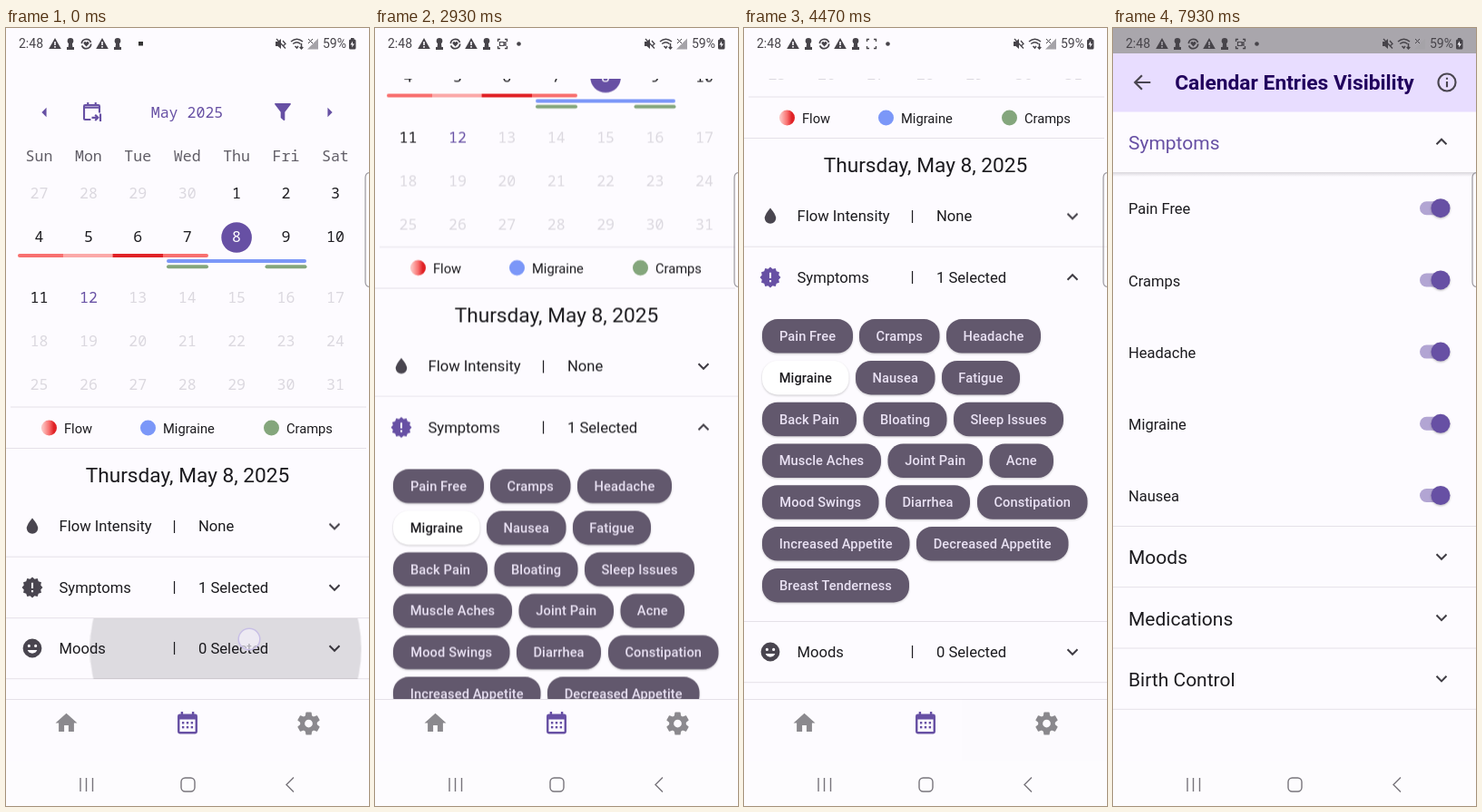
Animation of 400x858 px, one loop 8 s. Source, as an HTML page:

```html
<!DOCTYPE html>
<html lang="en">
<head>
<meta charset="utf-8">
<title>Cycle calendar</title>
<style>
html, body { margin: 0; width: 100%; height: 100%; overflow: hidden; background: #fdfbff; }
#app { display: block; width: 100vw; height: 100vh; font-family: Roboto, sans-serif; fill: #1c1b1f; }
.mono { font-family: "Noto Sans Mono", "DejaVu Sans Mono", monospace; }
.line { stroke: #e5e1e8; stroke-width: 1; }
.chev { fill: none; stroke: #3f3c44; stroke-width: 2; }
.flip { transform-box: fill-box; transform-origin: center; }
.icon { color: #49454f; fill: currentColor; fill-rule: evenodd; }
.stroke { fill: none; stroke: currentColor; }
.chip rect { fill: #62586d; filter: drop-shadow(0 1px 1px #0003); }
.chip text { fill: #e9e1f3; font-weight: 500; letter-spacing: .12px; }
.chip.on rect { fill: #fff; }
.chip.on text { fill: #1c1b1f; }

#scroll, #flowRow, #flowBody, #symRow, #symBody, #below1, #below2, #bar1, #bar2, #drag1, #drag2,
#settings, #visibility, #more, #subs, #custom, .tabOff, .tabOn, .frame, .start, .blink,
.flip, .rip, .tap { animation: 8s linear infinite; }

/* percent = ms / 80 */
#scroll { animation-name: scroll; }
@keyframes scroll {
  0%, .375% { transform: none; animation-timing-function: cubic-bezier(.4,0,.2,1); }
  5.75%, 36.625% { transform: translateY(-176.5px); animation-timing-function: cubic-bezier(.4,0,.2,1); }
  43.125%, 100% { transform: translateY(-342px); }
}
#bar1 { animation-name: bar1; }
@keyframes bar1 {
  0%, .375% { transform: none; opacity: 0; animation-timing-function: cubic-bezier(.4,0,.2,1); }
  1.2% { opacity: 1; }
  5.75% { transform: translateY(139px); opacity: 1; }
  9.6%, 100% { transform: translateY(139px); opacity: 0; }
}
#bar2 { animation-name: bar2; }
@keyframes bar2 {
  0%, 36.625% { transform: translateY(100px); opacity: 0; animation-timing-function: cubic-bezier(.4,0,.2,1); }
  37.5% { opacity: 1; }
  43.125% { transform: translateY(193.5px); opacity: 1; }
  46.25%, 100% { transform: translateY(193.5px); opacity: 0; }
}
#drag1 { animation-name: drag1; }
@keyframes drag1 {
  0%, .375% { transform: translate(268px,674px); opacity: 1; animation-timing-function: cubic-bezier(.4,0,.2,1); }
  4% { opacity: 1; }
  5.75%, 100% { transform: translate(315px,503px); opacity: 0; }
}
#drag2 { animation-name: drag2; }
@keyframes drag2 {
  0%, 36.625% { transform: translate(276px,657px); opacity: 0; animation-timing-function: cubic-bezier(.4,0,.2,1); }
  37.2%, 42% { opacity: 1; }
  43.125% { transform: translate(321px,491px); }
  43.7%, 100% { transform: translate(321px,491px); opacity: 0; }
}
#flowRow { animation-name: flowRow; animation-timing-function: step-end; }
@keyframes flowRow { 0%, 29.4% { color: #49454f; } 15.4% { color: #6750a4; } 100% { color: #49454f; } }
#flowRow .flip { animation-name: flowChev; animation-timing-function: step-end; }
@keyframes flowChev { 0%, 29.4%, 100% { transform: none; } 15.4% { transform: scaleY(-1); } }
#flowBody { animation-name: flowBody; animation-timing-function: step-end; }
@keyframes flowBody { 0%, 29.4%, 100% { opacity: 0; } 15.4% { opacity: 1; } }
#below1 { animation-name: below1; animation-timing-function: step-end; }
@keyframes below1 { 0%, 29.4%, 100% { transform: none; } 15.4% { transform: translateY(70px); } }
#symRow { animation-name: symRow; animation-timing-function: step-end; }
@keyframes symRow { 0% { color: #49454f; } 29.4%, 100% { color: #6750a4; } }
#symRow .flip { animation-name: symChev; animation-timing-function: step-end; }
@keyframes symChev { 0% { transform: none; } 29.4%, 100% { transform: scaleY(-1); } }
#symBody { animation-name: symBody; animation-timing-function: step-end; }
@keyframes symBody { 0% { opacity: 0; } 29.4%, 100% { opacity: 1; } }
#below2 { animation-name: below2; animation-timing-function: step-end; }
@keyframes below2 { 0% { transform: none; } 29.4%, 100% { transform: translateY(346px); } }

#settings { animation-name: settings; }
@keyframes settings { 0%, 57.125% { opacity: 0; } 58.2%, 100% { opacity: 1; } }
.tabOff { animation-name: tabOff; }
@keyframes tabOff { 0%, 57.125% { color: #6750a4; } 58.2%, 100% { color: #8b898e; } }
.tabOn { animation-name: tabOn; }
@keyframes tabOn { 0%, 57.125% { color: #8b898e; } 58.2%, 100% { color: #6750a4; } }
#custom { animation-name: custom; animation-timing-function: step-end; }
@keyframes custom { 0% { fill: #1c1b1f; } 68.25%, 100% { fill: #6750a4; } }
#custom .flip { animation-name: customChev; animation-timing-function: step-end; }
@keyframes customChev { 0% { transform: none; } 68.25%, 100% { transform: scaleY(-1); } }
#subs { animation-name: subs; animation-timing-function: step-end; }
@keyframes subs { 0% { opacity: 0; } 68.25%, 100% { opacity: 1; } }
#more { animation-name: more; animation-timing-function: step-end; }
@keyframes more { 0% { transform: translateY(-143.5px); } 68.25%, 100% { transform: none; } }
#visibility { animation-name: visibility; }
@keyframes visibility {
  0%, 91.75% { opacity: 0; transform: translateY(36px); animation-timing-function: ease-out; }
  94.6%, 100% { opacity: 1; transform: none; }
}

.rip { fill: #1c1b1f; transform-box: fill-box; transform-origin: center; animation-name: rip; }
@keyframes rip {
  0% { transform: scale(.15); opacity: 0; }
  .6% { opacity: .14; }
  1.4% { transform: scale(.62); opacity: .14; }
  3% { transform: scale(1); opacity: .12; }
  5%, 100% { transform: scale(1.1); opacity: 0; }
}
.tap { opacity: 0; animation-name: tap; }
@keyframes tap { 0% { opacity: 0; } .4%, 1.8% { opacity: 1; } 3.4%, 100% { opacity: 0; } }
.dot { fill: #f4f1fbb0; stroke: #c8bfe6; stroke-width: 1.5; }

.start { animation-name: start; animation-timing-function: step-end; }
@keyframes start { 0% { opacity: 1; } .375%, 100% { opacity: 0; } }
.frame { animation-name: frame; animation-timing-function: step-end; }
@keyframes frame { 0% { opacity: 0; } .375%, 100% { opacity: 1; } }
.blink { animation: blink 1s step-end -70ms infinite; }
@keyframes blink { 0% { opacity: 0; } 0%, 14% { opacity: 1; } 14%, 100% { opacity: 1; } }
.blink { animation: onoff 1s step-end -930ms infinite; animation-delay: -70ms; }
@keyframes onoff { 0% { opacity: 1; } 50%, 100% { opacity: 0; } }
</style>
</head>
<body>
<svg id="app" viewBox="0 0 400 858" preserveAspectRatio="none"></svg>
<script>
const BG = '#fdfbff', PURPLE = '#6750a4';
const many = (list, fn) => list.map(fn).join('');
const text = (x, y, size, str, attr = '') =>
  `<text x="${x}" y="${y + size * .355}" font-size="${size}" ${attr}>${str}</text>`;
const mid = 'text-anchor="middle"';
const rect = (x, y, w, h, fill, r = 0) => `<rect x="${x}" y="${y}" width="${w}" height="${h}" rx="${r}" fill="${fill}"/>`;
const circle = (x, y, r, attr = '') => `<circle cx="${x}" cy="${y}" r="${r}" ${attr}/>`;
const line = (y, x1 = 0, x2 = 400) => `<path class="line" d="M${x1} ${y}H${x2}"/>`;
const at = (x, y, body, attr = '') => `<g transform="translate(${x} ${y})" ${attr}>${body}</g>`;
const chevron = (x, y, cls = '', flip = 1) =>
  at(x, y, `<path class="chev ${cls}" d="M-5.5 ${-2.8 * flip}L0 ${2.8 * flip}L5.5 ${-2.8 * flip}"/>`);
// icons live on a 24 unit grid
const icon = (x, y, name, scale = 1.04, attr = 'class="icon"') =>
  `<g ${attr}><g transform="translate(${x} ${y}) scale(${scale}) translate(-12 -12)">${icons[name]}</g></g>`;
const ripple = (x, y, w, h, cx, r, start) =>
  `<svg x="${x}" y="${y}" width="${w}" height="${h}">${circle(cx - x, h / 2, r, `class="rip" style="animation-delay:${start - 8000}ms"`)}</svg>`;
const tap = (x, y, start) => at(x, y, circle(0, 0, 11.5, `class="dot tap" style="animation-delay:${start - 8000}ms"`));

const path = d => `<path d="${d}"/>`;
const seal = Array.from({ length: 24 }, (_, i) => {
  const a = i * Math.PI / 12, r = i % 2 ? 9.2 : 11;
  return `${(12 + r * Math.sin(a)).toFixed(2)} ${(12 - r * Math.cos(a)).toFixed(2)}`;
}).join('L');
const teeth = many([0, 60, 120, 180, 240, 300], a =>
  `<path transform="translate(12 12) rotate(${a})" d="M-3.1-5.8L-2.5-9.5Q-2.4-10-2-10H2Q2.4-10 2.5-9.5L3.1-5.8Z"/>`);
const icons = {
  home: path('M10 20V14H14V20H19V12H22L12 3L2 12H5V20Z'),
  month: path('M5 3H6V1H8V3H16V1H18V3H19A2 2 0 0 1 21 5V19A2 2 0 0 1 19 21H5A2 2 0 0 1 3 19V5A2 2 0 0 1 5 3ZM5 8V19H19V8Z') +
    many([10, 14], y => many([7, 11, 15], x => rect(x, y, 2, 2, 'currentColor'))),
  gear: teeth + circle(12, 12, 5.5, 'class="stroke" stroke-width="4"'),
  drop: path('M12 20A6 6 0 0 1 6 14C6 10 12 3.25 12 3.25C12 3.25 18 10 18 14A6 6 0 0 1 12 20Z'),
  seal: path(`M${seal}ZM11 7V13H13V7ZM11 15V17H13V15Z`),
  smile: path('M12 2A10 10 0 0 0 12 22A10 10 0 0 0 12 2ZM8.5 8A1.5 1.5 0 0 1 8.5 11A1.5 1.5 0 0 1 8.5 8ZM15.5 8A1.5 1.5 0 0 1 15.5 11A1.5 1.5 0 0 1 15.5 8ZM6.9 14H17.1A5.5 5.5 0 0 1 6.9 14Z'),
  pill: path('M4.2 11.3L11.3 4.2A6 6 0 0 1 19.8 12.7L12.7 19.8A6 6 0 0 1 4.2 11.3ZM5.6 12.7Q4 14.4 4.6 16.6L10.6 10.6L14.8 14.8L18.4 11.3A4 4 0 0 0 12.7 5.6Z'),
  shield: path('M12 1L3 5V11C3 16.5 6.8 21.7 12 23C17.2 21.7 21 16.5 21 11V5ZM10 17L6 13L7.4 11.6L10 14.2L16.6 7.6L18 9Z'),
  note: path('M5 3A2 2 0 0 0 3 5V19A2 2 0 0 0 5 21H19A2 2 0 0 0 21 19V9L15 3ZM14 4.5L19.5 10H14Z'),
  left: path('M14 7L9 12L14 17Z'),
  right: path('M10 7L15 12L10 17Z'),
  funnel: '<path stroke="currentColor" stroke-width="1.4" stroke-linejoin="round" d="M4.6 4H19.4L13.4 12V20L10.6 17.6V12Z"/>',
  jump: '<path class="stroke" stroke-width="2" d="M11 20H5Q4 20 4 19V6Q4 5 5 5H19Q20 5 20 6V13M4 7.5H20M8 2V5M16 2V5M12 18H18M15.5 15L18.5 18L15.5 21M21 14V22"/>',
  arrow: '<path class="stroke" stroke-width="2" d="M4 12H19M12.5 5L19.5 12L12.5 19"/>',
  back: '<path class="stroke" stroke-width="2" d="M20 12H5M11.5 5L4.5 12L11.5 19"/>',
  info: circle(12, 12, 9, 'class="stroke" stroke-width="2"') + path('M11 7V9H13V7ZM11 11V17H13V11Z')
};

// calendar
const colX = i => 36.5 + i * 54.4;
const weekY = [182.5, 230.5, 297, 345, 393];
function day(i) {
  const n = i - 3, col = i % 7, y = weekY[Math.floor(i / 7)];
  const fill = n < 1 || n > 12 ? '#dbd8df' : n === 12 ? PURPLE : n === 8 ? '#fff' : '#1c1b1f';
  return (n === 8 ? circle(colX(col), y + .5, 16.8, `fill="${PURPLE}"`) : '') +
    text(colX(col), y, 16.6, n < 1 ? n + 30 : n, `${mid} class="mono" fill="${fill}"`);
}
const bars = [[13, 251, 210, '#f8706f'], [63, 251, 54, '#fba9a8'], [118, 251, 55, '#e02226'],
  [177, 257, 154, '#7b97f8'], [177, 263.3, 46, '#84a67c'], [285.5, 263.3, 46, '#84a67c']];
const calendar =
  icon(42.5, 93, 'left', 1.04, `class="icon" style="color:${PURPLE}"`) +
  icon(94.5, 92.5, 'jump', 1.06, `class="icon" style="color:${PURPLE}"`) +
  text(199.5, 93.5, 16.6, 'May 2025', `${mid} class="mono" fill="${PURPLE}"`) +
  icon(305, 92.5, 'funnel', 1.1, `class="icon" style="color:${PURPLE}"`) +
  icon(356.5, 93, 'right', 1.04, `class="icon" style="color:${PURPLE}"`) +
  many(['Sun', 'Mon', 'Tue', 'Wed', 'Thu', 'Fri', 'Sat'], (d, i) => text(colX(i), 141.5, 16.6, d, `${mid} class="mono" fill="#605d66"`)) +
  many([...Array(35).keys()], day) +
  many(bars, ([x, y, w, c], i) => rect(x, y - 2, w, 4, c, i === 1 || i === 2 ? 0 : 2)) +
  line(418, 5, 397) + line(463.5, 0, 397) +
  many([[47.5, 'Flow', 'url(#reds)'], [156.5, 'Migraine', '#7b97f8'], [292.5, 'Cramps', '#84a67c']],
    ([x, s, c]) => circle(x, 441, 8.5, `fill="${c}"`) + text(x + 16.5, 441.5, 14.7, s)) +
  text(200, 493, 22.7, 'Thursday, May 8, 2025', mid);

const row = (y, pic, name, value) =>
  icon(29, y, pic, 1.04, 'fill="currentColor" fill-rule="evenodd"') + text(58.5, y, 16.6, name) +
  (value ? text(183.5, y - .5, 16.6, '|') + text(212, y, 16.6, value) : '') +
  chevron(362, y, 'flip') + line(y + 33.7);

const chip = ([str, x, w], y) => `<g class="chip${str === 'Migraine' || str === 'None' ? ' on' : ''}">` +
  `<rect x="${x}" y="${y - 18.7}" width="${w}" height="37.5" rx="17"/>${text(x + w / 2, y, 14.6, str, mid)}</g>`;
const chipRows = [
  [['Pain Free', 20, 100], ['Cramps', 127, 88.5], ['Headache', 223, 104]],
  [['Migraine', 20, 95.5], ['Nausea', 123, 87.5], ['Fatigue', 218, 86]],
  [['Back Pain', 20, 104], ['Bloating', 131.5, 92], ['Sleep Issues', 231, 121]],
  [['Muscle Aches', 20, 131], ['Joint Pain', 158.5, 104.5], ['Acne', 270.5, 70.5]],
  [['Mood Swings', 20, 128.5], ['Diarrhea', 156, 93], ['Constipation', 257, 121.5]],
  [['Increased Appetite', 20, 162.5], ['Decreased Appetite', 190, 167.5]],
  [['Breast Tenderness', 20, 162]]
];
const others = [['smile', 'Moods', '0 Selected'], ['pill', 'Medications', '0 Selected'], ['shield', 'Birth Control', 'None'], ['note', 'Notes']];
const open = (id, body) => `<g id="${id}">${body}</g>`;
const list =
  open('flowRow', row(549.5, 'drop', 'Flow Intensity', 'None')) +
  ripple(0, 516, 400, 67, 270, 240, 1150) +
  open('flowBody', rect(0, 582, 400, 3, BG) + chip(['None', 20, 74], 614) + line(653)) +
  open('below1',
    open('symRow', row(617, 'seal', 'Symptoms', '1 Selected')) +
    ripple(0, 584, 400, 67, 270, 240, 2250) +
    open('symBody', rect(0, 649, 400, 3, BG) + many(chipRows, (r, i) => many(r, c => chip(c, 681.8 + i * 45.8))) + line(996.5)) +
    open('below2', `<g color="#49454f">${many(others, (o, i) => row(684 + i * 67.3, ...o))}</g>` + ripple(0, 651, 400, 67, 242, 240, -112)));

// settings
const setting = (y, s) => text(27, y, 21, s) + chevron(351.5, y - .7, 'flip') + line(y + 41, 10, 390);
const entry = (y, a, b) => text(27, y, 16.6, a) + text(27, y + 21.5, 14.5, b, 'fill="#49454f"') + icon(351.5, y + 9.5, 'arrow', 1.1);
const settings = rect(0, 28, 400, 712, BG) +
  `<svg width="400" height="72">${text(200, 57, 31.2, 'Settings', mid + ' font-weight="700"')}</svg>` +
  line(82, 10, 390) + setting(125, 'Lock App Behind Authentication') +
  `<g id="custom">${text(27, 209, 21, 'Customization')}${chevron(351.5, 208, 'flip')}</g>` +
  ripple(10, 166, 380, 84, 220, 230, 5340) +
  open('subs', entry(268.5, 'Calendar Entries Visibility', "Choose what's visible on the calendar") +
    entry(340, 'Custom Entries', 'Add your own custom entries to track')) +
  ripple(10, 250, 380, 64, 300, 240, 7150) +
  open('more', line(393.5, 10, 390) + setting(436.5, 'Change Theme Color') + setting(521, 'Delete Data') + setting(605, 'Privacy Policy'));

const tabs = rect(0, 740, 400, 68, BG) + line(740.5) +
  icon(66.5, 766.5, 'home', 1.2, 'class="icon" style="color:#8b898e"') +
  icon(200, 767.5, 'month', 1.22, 'class="icon tabOff"') + icon(333.5, 767, 'gear', 1.25, 'class="icon tabOn"') +
  ripple(240, 740, 160, 68, 333, 93, 4080);

const toggle = y => rect(338, y - 7.5, 30, 15, '#b2a5d3', 7.5) +
  circle(361, y, 10.5, `fill="${PURPLE}" style="filter:drop-shadow(0 1px 1px #0004)"`);
const visibility = rect(0, 0, 400, 808, BG) + rect(0, 0, 400, 28, '#a9a6ac') + rect(0, 28, 400, 64.5, '#e8ddff') +
  icon(32.5, 60, 'back', 1.1) + text(200, 60, 22.8, 'Calendar Entries Visibility', `${mid} font-weight="700" fill="#21005d"`) +
  icon(368, 60, 'info', 1.06) +
  rect(0, 159, 400, 5, 'url(#shade)') + text(17, 126.5, 21, 'Symptoms', `fill="${PURPLE}"`) + chevron(362, 125.5, '', -1) +
  many(['Pain Free', 'Cramps', 'Headache', 'Migraine', 'Nausea'], (s, i) => text(17, 199.5 + i * 79.2, 16.5, s) + toggle(198.7 + i * 79.2)) +
  line(549.5) +
  many(['Moods', 'Medications', 'Birth Control'], (s, i) => text(17, 584 + i * 67.3, 21, s) + chevron(362, 583 + i * 67.3) + line(616.7 + i * 67.3));

// system bars
const warn = x => at(x, 17.5, path('M0-6.5L6.8 5.5H-6.8ZM-.8-2.5V1.5H.8V-2.5ZM-.8 2.6V4.2H.8V2.6Z'));
const pawn = x => at(x, 17.5, circle(0, -3.2, 3.3) + path('M-1.8-2H1.8L2.4 3.5H4V6.5H-4V3.5H-2.4Z'));
const status = `<g fill="#47444a" fill-rule="evenodd" color="#47444a">` +
  text(14, 17.5, 14, '2:48') + warn(54) + pawn(71) + warn(106) + pawn(123) +
  at(88.5, 17.5, circle(0, 0, 5.2, 'class="stroke" stroke-width="1.7" stroke-dasharray="14 2.3"') + path('M0 3L-2.8 0A1.5 1.5 0 0 1 0-1.6A1.5 1.5 0 0 1 2.8 0Z')) +
  `<g class="start">${rect(146, 15, 5, 4.5, '#333')}</g>` +
  `<g class="frame"><path class="stroke" stroke-width="1.3" d="M135.5 15V12.5H138M143 12.5H145.5V15M145.5 20V22.5H143M138 22.5H135.5V20"/>` +
  `<g class="blink"><path class="stroke" stroke-width="1.2" d="M137.5 15.5H142V19.5H137.5ZM142 17L144 15.8V19.2L142 18"/></g>${circle(158.5, 17.5, 2.3)}</g>` +
  path('M297 15H299.5L303 12V23L299.5 20H297Z') + '<path class="stroke" stroke-width="1.3" d="M298 12L308 22.5M305 14L308 17.5L305 20"/>' +
  '<path class="stroke" stroke-width="1.5" d="M314 15Q320.5 9.5 327 15M316.2 17.5Q320.5 14 324.5 17.5M318.5 20L320.5 22L322 20M325.5 17V23M323.7 21L325.5 23L327.3 21"/>' +
  '<path fill="#a5a3a8" d="M332 23.5H344V11.5Z"/><path class="stroke" d="M333 12L338 17M338 12L333 17"/>' +
  text(349, 17.5, 14, '59%') + rect(378, 12.5, 7.5, 11, '#47444a', 1.5) + rect(380, 11, 3.5, 2, '#47444a') +
  `<path d="M382 14.5L379.5 18.5H381.5L381 21.5L384 17.5H382Z" fill="${BG}"/></g>`;
const navBar = rect(0, 808, 400, 50, '#fdfcfe') +
  '<path fill="none" stroke="#77747b" stroke-width="1.4" d="M82 827V842M88.5 827V842M95.5 827V842M317 826.5L309 834.5L317 842.5"/>' +
  '<rect x="193" y="827" width="15" height="15" rx="4.5" fill="none" stroke="#77747b" stroke-width="1.4"/>';
const edge = '<path d="M400.5 159.5Q396 160 396 165V280Q396 285 400.5 285.5" fill="#ffffff66" stroke="#98959c" stroke-width="1.2"/>';

document.getElementById('app').innerHTML =
  `<defs><linearGradient id="reds"><stop offset=".1" stop-color="#fcc0be"/><stop offset=".5" stop-color="#f8706f"/><stop offset=".8" stop-color="#e02226"/></linearGradient>
  <linearGradient id="shade" x2="0" y2="1"><stop stop-color="#d9d6dc"/><stop offset="1" stop-color="${BG}"/></linearGradient>
  <clipPath id="view"><path d="M0 56H400V740H0Z"/></clipPath></defs>` +
  rect(0, 0, 400, 858, BG) +
  `<g clip-path="url(#view)"><g id="scroll">${calendar}${list}</g></g>` +
  `<g id="bar1">${rect(396, 56, 4, 536, '#a9a7ab')}</g><g id="bar2">${rect(396, 56, 4, 382, '#a9a7ab')}</g>` +
  open('settings', settings) + tabs + open('visibility', visibility) + navBar + status + edge +
  many(['drag1', 'drag2'], id => `<g id="${id}">${circle(0, 0, 11.8, 'class="dot"')}</g>`) +
  tap(300, 374, 1130) + tap(300, 510, 2230) + tap(333, 767, 3950) + tap(220, 209, 5330) + tap(320, 279, 7130);
</script>
</body>
</html>
```
